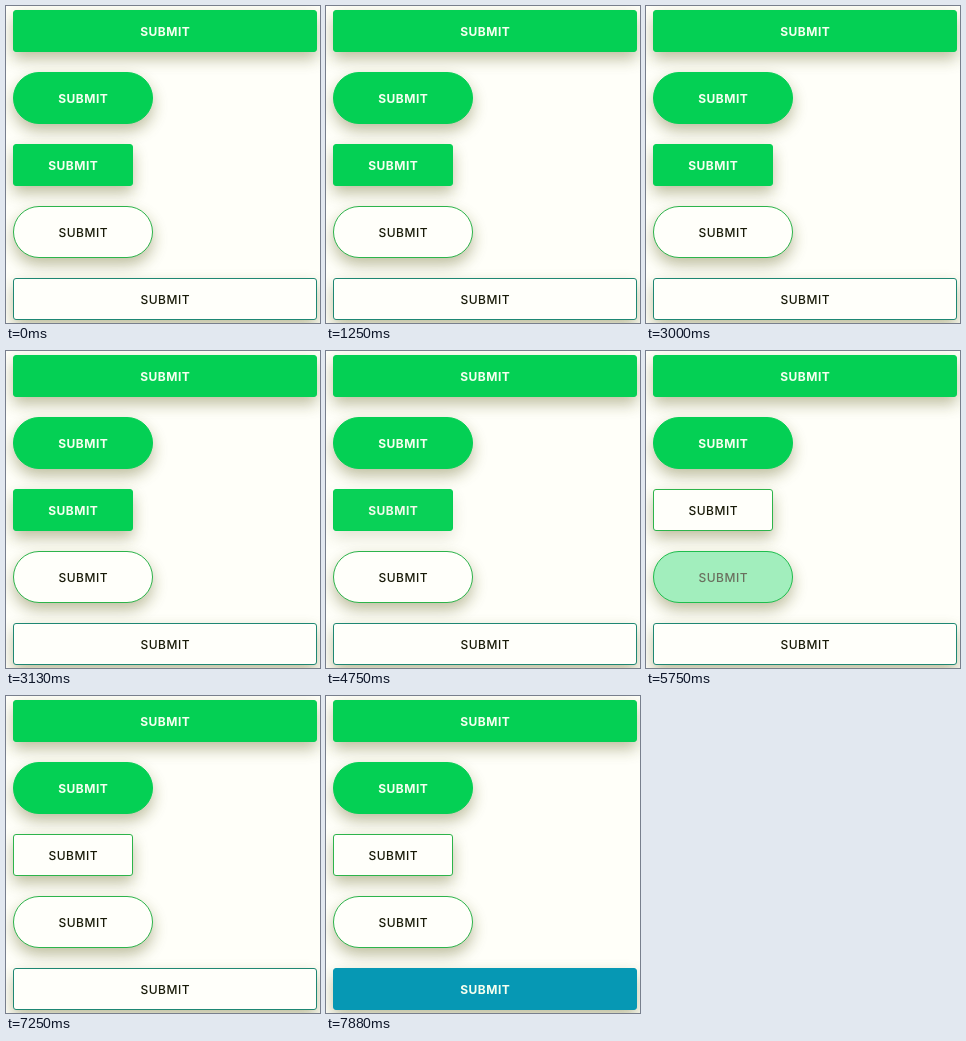
Animation of 314x317 px, one loop 8 s. Source, as an HTML page:

```html
<!DOCTYPE html>
<html lang="en">
<head>
<meta charset="utf-8">
<style>
  html, body { margin: 0; width: 100%; height: 100%; overflow: hidden; background: #fffff9; }
  svg { display: block; width: 100%; height: 100%; }
  text { font: 600 12px Inter, "Open Sans", sans-serif; letter-spacing: 0.5px; text-anchor: middle; }
</style>
</head>
<body>
<svg id="stage" viewBox="0 0 314 317">
  <defs>
    <filter id="blur" x="-40" y="-40" width="394" height="397" filterUnits="userSpaceOnUse">
      <feGaussianBlur stdDeviation="7.5"/>
    </filter>
  </defs>
</svg>
<script>
const LOOP = 8000;
const GREEN = [4, 208, 84], BLUE = [6, 152, 180], PAPER = [255, 255, 250];
const INK = [24, 26, 8], WHITE = [246, 255, 240];

// fill and shadow are held steps: [start ms, amount]
const on = [[0, 1]], off = [[0, 0]];
const buttons = [
  { y: 4, w: 304, h: 42, r: 3, color: GREEN, fill: on, shadow: on },
  { y: 66, w: 140, h: 52, r: 26, color: GREEN, fill: on, shadow: on },
  { y: 138, w: 120, h: 42, r: 3, color: GREEN,
    fill: [[0, 1], [4750, 0.98], [4880, 0]],
    shadow: [[0, 1], [4750, 0.4], [4880, 1]] },
  { y: 200, w: 140, h: 52, r: 26, color: GREEN,
    fill: [[0, 0], [5750, 0.37], [5880, 1], [7130, 0.4], [7250, 0]], shadow: on },
  { y: 272, w: 304, h: 42, r: 3, color: BLUE, edge: [30, 135, 115],
    fill: [[0, 0], [7750, 0.45], [7880, 1]], shadow: on }
];

const stage = document.getElementById("stage");

function add(tag, attrs) {
  const node = document.createElementNS("http://www.w3.org/2000/svg", tag);
  for (const key in attrs) node.setAttribute(key, attrs[key]);
  return stage.appendChild(node);
}

const rgb = c => `rgb(${c.map(Math.round)})`;
const mix = (a, b, k) => rgb(a.map((v, i) => v + (b[i] - v) * k));
const held = (steps, t) => steps.filter(s => s[0] <= t).pop()[1];

for (const b of buttons) {
  b.shade = add("rect", { x: 7, y: b.y + 7, width: b.w, height: b.h, rx: b.r,
    fill: "rgb(95,95,30)", filter: "url(#blur)" });
  b.box = add("rect", { x: 7.5, y: b.y + 0.5, width: b.w - 1, height: b.h - 1, rx: b.r - 0.5 });
  b.label = add("text", { x: 7.25 + b.w / 2, y: b.y + b.h / 2 + 5 });
  b.label.textContent = "SUBMIT";
}

function draw(t) {
  for (const b of buttons) {
    const k = held(b.fill, t);
    b.shade.setAttribute("opacity", 0.4 * held(b.shadow, t));
    b.box.setAttribute("fill", mix(PAPER, b.color, k));
    b.box.setAttribute("stroke", mix(b.edge || [45, 180, 75], b.color, k));
    b.label.setAttribute("fill", mix(INK, WHITE, k));
    b.label.style.fontWeight = k > 0.5 ? 700 : 500;
  }
}

const start = performance.now();
function tick() {
  draw((performance.now() - start) % LOOP);
  requestAnimationFrame(tick);
}
tick();
</script>
</body>
</html>
```
